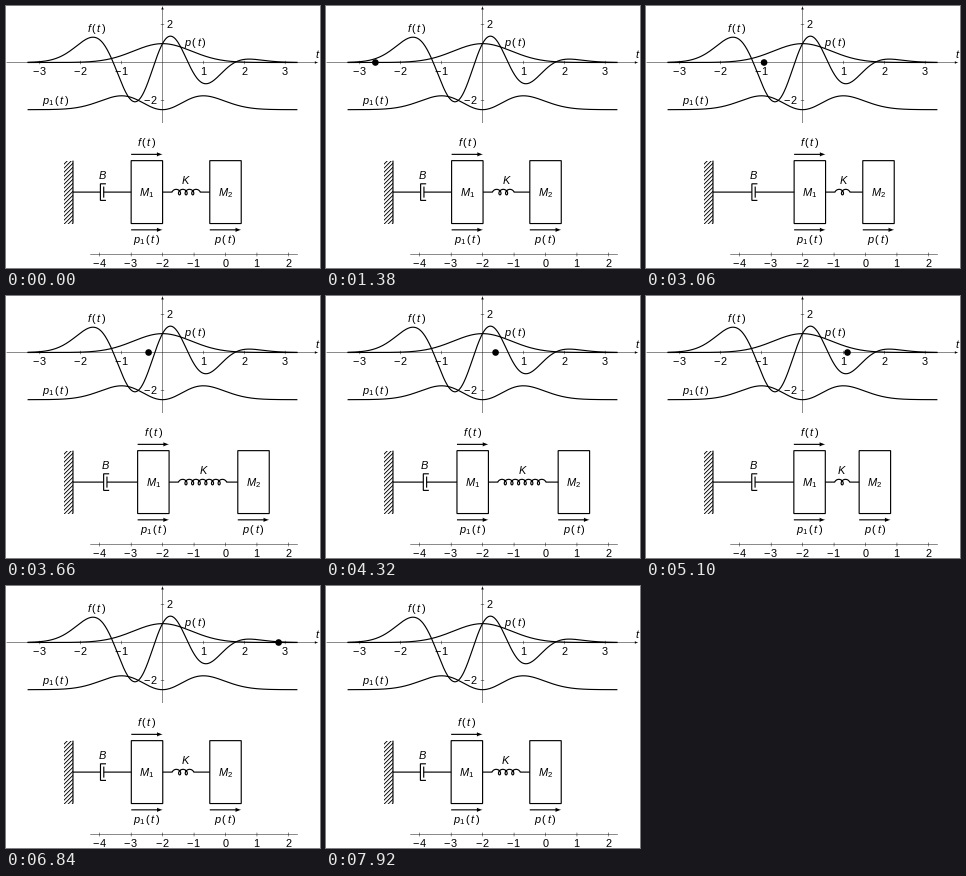
Write a matplotlib script that moves like this. It is 314 by 262 pixels and loops after 8.04 s.

```python
import numpy as np
import matplotlib.pyplot as plt
from matplotlib.animation import FuncAnimation
from matplotlib.patches import Circle, PathPatch, Rectangle
from matplotlib.path import Path
from matplotlib.transforms import Affine2D

W, H, DPI = 314, 262, 64
PX = 72 / DPI               # points per pixel
CM = 31.45                  # pixels per drawing unit
PT = CM / 28.45             # pixels per typographic point
THIN, THICK = 0.45, 1.15
FONT = 11

plt.rcParams.update({
    "path.snap": False,
    "font.family": "Liberation Sans",
    "mathtext.fontset": "custom",
    "mathtext.rm": "Liberation Sans",
    "mathtext.it": "Liberation Sans:italic",
})

fig = plt.figure(figsize=(W / DPI, H / DPI), dpi=DPI, facecolor="white")
ax = fig.add_axes([0, 0, 1, 1])
ax.set_xlim(0, W)
ax.set_ylim(H, 0)
ax.axis("off")


# ---- the system: mass 0.5 each, damping 1, stiffness 1 ----
def p(t):
    return np.exp(-t * t)


def p1(t):
    return 2 * t**2 * p(t)


def force(t):
    acc = 4 - 20 * t**2 + 8 * t**4
    vel = 4 * t - 4 * t**3
    return (0.5 * acc + vel + 2 * t**2 - 1) * p(t)


# ---- drawing helpers ----
def line(xs, ys, lw=THICK, tr=None):
    return ax.plot(xs, ys, color="black", lw=lw * PX, solid_capstyle="butt",
                   solid_joinstyle="miter", transform=tr or ax.transData)[0]


def label(x, y, s, tr=None, ha="center"):
    return ax.text(x, y, s, fontsize=FONT * PX, ha=ha, va="baseline",
                   color="black", transform=tr or ax.transData)


def head(x, y, lw, up=False, tr=None):
    a = 0.2 + 0.32 * lw
    v = a * np.array([(0, 0), (-2.667, 0.5), (-7, 2), (-10, 3.75),
                      (-10, -3.75), (-7, -2), (-2.667, -0.5), (0, 0)])
    if up:
        v = np.column_stack([v[:, 1], -v[:, 0]])
    codes = [Path.MOVETO] + [Path.CURVE4] * 3 + [Path.LINETO] + [Path.CURVE4] * 3
    ax.add_patch(PathPatch(Path(v + (x, y), codes), fc="black", lw=0,
                           transform=tr or ax.transData))


def arrow(x0, x1, y, lw=THICK, tr=None):
    line([x0, x1 - 3], [y, y], lw, tr)
    head(x1, y, lw, tr=tr)


def mover():
    shift = Affine2D()
    return shift, shift + ax.transData


def num(n):
    return rf"$-\,{-n}$" if n < 0 else f"${n}$"


def func(name):
    return rf"${name}\,(\,t\,)$"


F, P, P1 = func("f"), func("p"), func("p_1")

# ---- upper plot ----
OX, OY, UX, UY = 156.5, 56.5, 1.3 * CM, 0.6 * CM
arrow(0.6, 312.3, OY, THIN)
line([OX, OX], [117, 2], THIN)
head(OX, 0, THIN, up=True)
for n in (-3, -2, -1, 1, 2, 3):
    x = OX + n * UX
    line([x, x], [OY - 1.7, OY + 1.7], THIN)
    label(x, 69, num(n))
for n in (-2, 2):
    y = OY - n * UY
    line([OX - 1.7, OX + 1.7], [y, y], THIN)
label(160, 22.3, num(2), ha="left")
label(152.7, 98.3, num(-2), ha="right")
label(311.3, 51.5, "$t$")

ts = np.linspace(-3.3, 3.3, 400)
for ys in (force(ts), p(ts), p1(ts) - 2.5):
    line(OX + ts * UX, OY - ys * UY)
label(91, 26, F)
label(189, 40, P)
label(50, 98, P1)

dot = Circle((-20, OY), 3 * PT, fc="black", lw=0, zorder=5)
ax.add_patch(dot)
dot.set_clip_path(Rectangle((0, 0), 312, H, transform=ax.transData))

# ---- lower scale ----
SX, SY = 219.5, 248.5


def sx(u):
    return SX + u * CM


line([sx(-4.3), sx(2.3)], [SY, SY], THIN)
for n in range(-4, 3):
    line([sx(n), sx(n)], [SY - 1.9, SY + 1.9], THIN)
    label(sx(n), 261, num(n))

# ---- wall ----
MY = 186.1
TOP, BOT = MY - CM, MY + CM
WALL = sx(-4.85)
LEFT = WALL - 0.3 * CM
hatch = Rectangle((LEFT, TOP), WALL - LEFT, BOT - TOP, transform=ax.transData)
for c in np.arange(LEFT + TOP, WALL + BOT, 4):
    line([LEFT, WALL], [c - LEFT, c - WALL], 0.9).set_clip_path(hatch)
line([WALL, WALL], [TOP, BOT])

# ---- masses ----
shift1, tr1 = mover()
shift2, tr2 = mover()
M1L, M1R, M2L, M2R = sx(-3), sx(-2), sx(-0.5), sx(0.5)
for x0, x1, name, pos, tr in ((M1L, M1R, "$M_1$", P1, tr1),
                              (M2L, M2R, "$M_2$", P, tr2)):
    mid = (x0 + x1) / 2
    ax.add_patch(Rectangle((x0, TOP), x1 - x0, BOT - TOP, fill=False,
                           ec="black", lw=THICK * PX, transform=tr))
    label(mid, 189.7, name, tr)
    arrow(x0, x1, BOT + 0.2 * CM, tr=tr)
    label(mid, 237.4, pos, tr)
arrow(M1L, M1R, TOP - 0.2 * CM, tr=tr1)
label((M1L + M1R) / 2, 140.2, F, tr1)

# ---- damper, drawn around x = 0 ----
shift_b, tr_b = mover()
cup, half = 1.5 * PT, 7.5 * PT
line([cup + 2 * PT, -cup, -cup, cup + 2 * PT],
     [MY - half, MY - half, MY + half, MY + half], tr=tr_b)
line([cup, cup], [MY - 5 * PT, MY + 5 * PT], tr=tr_b)
label(0, 173.2, "$B$", tr_b)
rod_l, rod_r = line([], []), line([], [])

# ---- spring: whole loops of fixed pitch between straight leads ----
shift_k, tr_k = mover()
label(0, 178.2, "$K$", tr_k)
PITCH, AMP, RX, LEAD = 6 * PT, 2.5 * PT, 2.25 * PT, 0.3 * CM
K = 0.555
LOOP = np.array([(0, K), (1 - K, 1), (1, 1), (1 + K, 1), (2, K), (2, 0),
                 (2, -K), (1 + K, -1), (1, -1), (1 - K, -1), (0, -K), (0, 0)])
spring = PathPatch(Path([(0, 0), (1, 0)]), fill=False, ec="black",
                   lw=THICK * PX, capstyle="butt")
ax.add_patch(spring)


def spring_path(x0, x1):
    tail = PITCH / 2 + 2 * RX
    n = max(int((x1 - x0 - 2 * LEAD - tail) // PITCH), 0)
    i = np.arange(12 * n + 6)
    unit = LOOP[i % 12]
    xs = x0 + LEAD + RX * unit[:, 0] + (i + 1) * PITCH / 12
    coil = np.column_stack([xs, MY - AMP * unit[:, 1]])
    verts = np.vstack([[(x0, MY), (x0 + LEAD, MY)], coil, [(x1, MY)]])
    codes = [Path.MOVETO, Path.LINETO] + [Path.CURVE4] * len(coil) + [Path.LINETO]
    return Path(verts, codes)


STEPS = 132


def update(i):
    # first and last poses are held for two ticks
    t = -3.94 + 0.06 * min(max(i - 1, 0), STEPS - 1)
    d1, d2 = p1(t) * CM, p(t) * CM
    dot.center = (OX + t * UX, OY)
    # off the axis at both ends of the loop
    dot.set_visible(0 < i < STEPS)
    shift1.clear().translate(d1, 0)
    shift2.clear().translate(d2, 0)
    mid = (WALL + M1L + d1) / 2
    shift_b.clear().translate(mid, 0)
    rod_l.set_data([WALL, mid - cup], [MY, MY])
    rod_r.set_data([mid + cup, M1L + d1], [MY, MY])
    a, b = M1R + d1, M2L + d2
    shift_k.clear().translate((a + b) / 2, 0)
    spring.set_path(spring_path(a, b))
    return []


anim = FuncAnimation(fig, update, frames=STEPS + 2, interval=60,
                     repeat=True, repeat_delay=0, blit=False)
plt.show()
```
